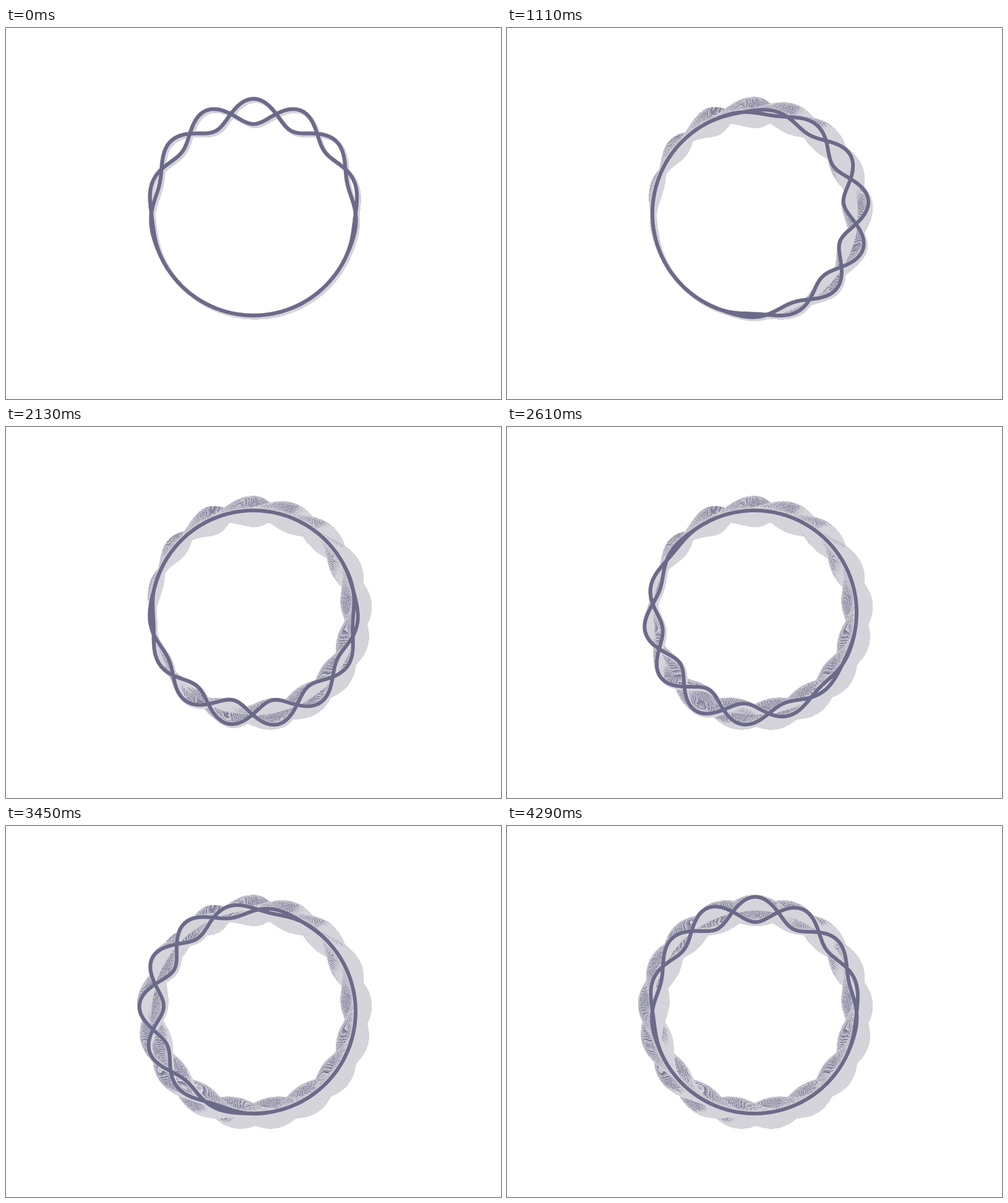
An HTML page with a canvas that plays this animation: 800x600 px, repeating every 4.32 s.

```html
<!DOCTYPE html>
<html lang="en">
<head>
<meta charset="utf-8">
<title>Braided ring</title>
<style>
  html, body { margin: 0; width: 100%; height: 100%; overflow: hidden; background: #fff; }
  canvas { display: block; position: absolute; left: 200px; top: 100px; }
</style>
</head>
<body>
<canvas id="stage" width="400" height="400"></canvas>
<script>
const SIZE = 400, MID = SIZE / 2;
const STEP = 30, STEPS = 144;
const RADIUS = 165, SWING = 20.4, WAVES = 7;
const REACH = Math.PI * 2 / 3;
const LINE = 6, FRINGE = 7.1, DROP = 3;
const INK = 'rgb(108,106,137)', SHADE = 'rgb(213,212,218)';

const stage = document.getElementById('stage').getContext('2d');
const scratch = document.createElement('canvas');
scratch.width = scratch.height = SIZE;
const pen = scratch.getContext('2d', { willReadFrequently: true });
pen.lineJoin = 'round';

const picture = stage.createImageData(SIZE, SIZE);
const pixels = new Uint32Array(picture.data.buffer);

// Wave strength: full at the travelling centre, none beyond REACH.
function strength(angle, centre) {
  const d = Math.abs(Math.atan2(Math.sin(angle - centre), Math.cos(angle - centre)));
  return d < REACH ? (1 + Math.cos(Math.PI * d / REACH)) / 2 : 0;
}

function strand(t, sign) {
  const path = new Path2D();
  for (let i = 0; i < 480; i++) {
    const a = i / 480 * Math.PI * 2;
    const wave = Math.cos(WAVES * a + 3 * Math.PI * t);
    const r = RADIUS + sign * SWING * strength(a, t * Math.PI * 2) * wave;
    path.lineTo(MID + r * Math.sin(a), MID - r * Math.cos(a));
  }
  path.closePath();
  return path;
}

function stroke(path, color, width, offset) {
  pen.setTransform(1, 0, 0, 1, offset, offset);
  pen.strokeStyle = color;
  pen.lineWidth = width;
  pen.stroke(path);
}

// Each step is laid hard-edged over the earlier ones. The line's thin pale
// fringe wipes most of the previous line, which leaves the grained trail.
function stamp(step) {
  const path = strand(step / STEPS, 1);
  path.addPath(strand(step / STEPS, -1));

  pen.setTransform(1, 0, 0, 1, 0, 0);
  pen.clearRect(0, 0, SIZE, SIZE);
  stroke(path, SHADE, FRINGE, DROP);
  stroke(path, SHADE, FRINGE, 0);
  stroke(path, INK, LINE, 0);

  const layer = new Uint32Array(pen.getImageData(0, 0, SIZE, SIZE).data.buffer);
  for (let i = 0; i < layer.length; i++) {
    if (layer[i] >>> 24 >= 128) pixels[i] = layer[i] | 0xff000000;
  }
}

let shown = -1;
function show(step) {
  if (step === shown) return;
  if (step < shown) {
    pixels.fill(0);
    shown = -1;
  }
  while (shown < step) stamp(++shown);
  stage.putImageData(picture, 0, 0);
}

const start = performance.now();
function tick() {
  const elapsed = performance.now() - start;
  show(Math.floor(elapsed / STEP) % STEPS);
  requestAnimationFrame(tick);
}
tick();
</script>
</body>
</html>
```
